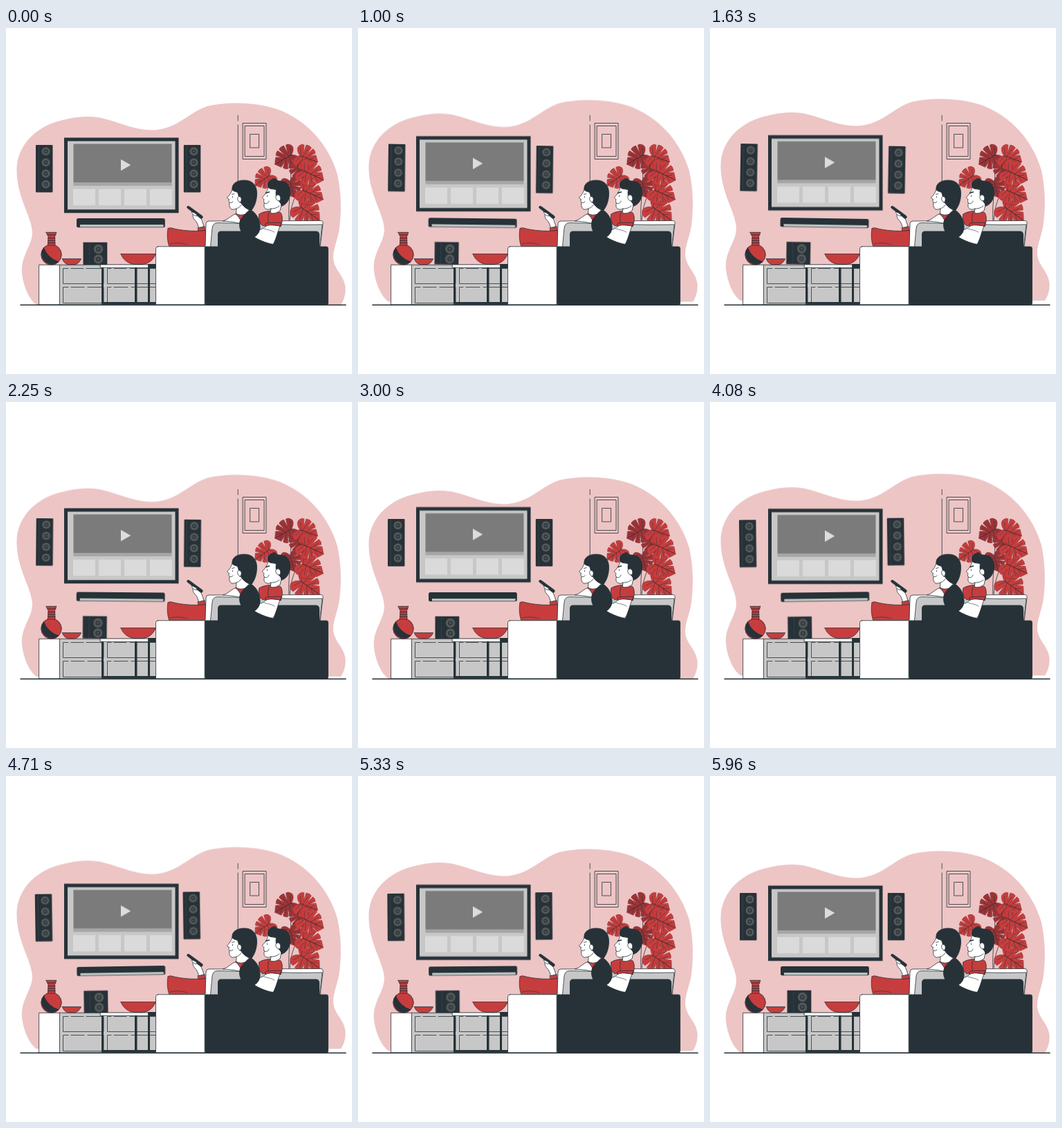
These frames come from a looping animation (500x500 px, 6000 ms). An HTML page:

```html
<!DOCTYPE html>
<html lang="en">
<head>
<meta charset="utf-8">
<title>Movie night</title>
<style>
  html, body { margin: 0; width: 100%; height: 100%; overflow: hidden; background: #fff; }
  svg { display: block; width: 100%; height: 100%; }
  .dark { fill: #263238; }
  .red { fill: #c73d3d; }
  .grey { fill: #c7c7c7; }
  .white { fill: #fff; }
  .ink { stroke: #263238; stroke-width: .8; stroke-linejoin: round; stroke-linecap: round; }
  .line { fill: none; }
  .deep { fill: #9d3437; }
  #blob { fill: #edc5c5; animation: rise 3s linear infinite; }
  #tv { animation: rise 6s linear infinite; }
  #audio { transform-origin: 162px 255.5px; animation: sway 6s linear infinite; }
  @keyframes rise { 50% { transform: translateY(-6.67px); } }
  @keyframes sway {
    0%, 100% { transform: rotate(0deg); }
    25% { transform: rotate(1deg); }
    75% { transform: rotate(-1deg); }
  }
</style>
</head>
<body>
<svg viewBox="0 0 500 500">
  <defs>
    <g id="cone">
      <circle r="6" fill="#555859"/>
      <circle r="3" fill="#263238"/>
      <circle r="1.9" fill="#484e51"/>
    </g>
    <g id="tower">
      <rect class="dark" x="0" y="0" width="24.5" height="68.5" rx="1"/>
      <path d="M4.2 1V67.5" stroke="#465055" stroke-width=".5"/>
      <use href="#cone" x="14.6" y="9.2"/>
      <use href="#cone" x="14.6" y="25.2"/>
      <use href="#cone" x="14.6" y="41.2"/>
      <use href="#cone" x="14.6" y="56.8"/>
    </g>
    <!-- split leaf, tip along +x -->
    <g id="half">
      <path d="M-8 .2C-13 -2 -19 -9 -15 -14C-13 -17 -10 -18 -8 -17.500L-4.500 -6L-5 -18.500Q1 -20 4.500 -17L1.500 -5.500L7.500 -16.500Q12 -15 13.500 -11L6.500 -4.500L15.500 -9Q18.500 -5 22 .2Z" stroke="#7d282c" stroke-width=".4"/>
      <path class="line" d="M-7 0L-12 -11M-4 0L0 -14M2 0L9 -11M8 0L15 -5"/>
    </g>
    <g id="leaf" stroke="#263238" stroke-width=".45">
      <use href="#half"/>
      <use href="#half" transform="scale(1 -1)"/>
      <path d="M-8 0H20" stroke-width=".7"/>
    </g>
  </defs>

  <path id="blob" d="M15.500 207C15 172 40 144 78 134C98 128.500 115 126.500 132 129C158 133 180 147 211 147.500C247 147 262 123 291 113C320 106 360 107 391 117C434 132 467 169 479 212C484.500 238 485 262 482 288C480 305 472 320 473 334C475 350 488 357 490.500 374C491 384 489 392 484 400H44C34 393 25 374 23 354C21 329 38 315 38 295C37 272 16 245 15.500 207Z"/>

  <g class="ink line">
    <path d="M335.200 126.500V134M335.200 140V222"/>
    <path d="M342.500 137.500H376V189.500H342.500ZM345.500 141.500H373V185.500H345.500ZM353 153.500H365.500V173H353Z"/>
  </g>

  <g id="tv">
    <rect class="dark" x="84" y="158.500" width="165.500" height="108.800"/>
    <rect class="grey" x="89" y="163.500" width="155.500" height="98.800"/>
    <rect x="97.500" y="167.500" width="142" height="56" fill="#7b7b7b"/>
    <rect x="97.500" y="223.500" width="142" height="4.500" fill="#a6a6a6"/>
    <path d="M166 189.800V206.200L180.300 198Z" fill="#dcdcdc"/>
    <path d="M97 232.700h32v23.500h-32zM134 232.700h32v23.500h-32zM171 232.700h32v23.500h-32zM208 232.700h32v23.500h-32z" fill="#dadada"/>
  </g>

  <g id="audio">
    <use href="#tower" x="43" y="169"/>
    <use href="#tower" x="256.800" y="169"/>
    <rect class="dark" x="102" y="275" width="127.800" height="13.200" rx="2.500"/>
    <rect class="grey" x="107" y="284.200" width="120.500" height="3.300"/>
    <rect class="dark" x="111.500" y="309.700" width="34.800" height="32.300"/>
    <path d="M120.700 310.500V342" stroke="#465055" stroke-width=".5"/>
    <use href="#cone" transform="translate(133.500 319.500) scale(1.120)"/>
    <use href="#cone" transform="translate(133.500 334) scale(1.120)"/>
  </g>

  <!-- cabinet and table -->
  <g class="ink">
    <rect class="grey" x="77.500" y="342.300" width="140" height="57.700"/>
    <rect class="white" x="48" y="342.300" width="29.500" height="57.700"/>
    <path class="line" d="M90 347.500H82.500V369.500H141V347.500H116M112 347.500H94M90 374.500H82.500V397.500H141V374.500H118M113 374.500H94M152 347.500H146.500V369.500H216M156 347.500H174M179 347.500H216M152 374.500H146.500V397.500H216M156 374.500H176M181 374.500H216"/>
  </g>
  <g class="dark">
    <path d="M138 346H141V396H186V346H189.500V396H205V347H208V396H217V399.500H138Z"/>
    <rect x="205" y="341" width="13" height="6"/>
  </g>
  <rect class="white ink" x="136.500" y="342" width="69" height="4.200"/>

  <!-- vase and bowls -->
  <g class="ink">
    <circle class="red" cx="65.500" cy="327.500" r="14.800"/>
    <path class="dark" d="M54.500 317.800A14.800 14.800 0 0 0 76 337.800Q61 333 54.500 317.800Z"/>
    <path class="red" d="M58 295.300H73L70.500 301L71 314H60.500L61 301Z"/>
    <path class="line" d="M59.500 299H72M61 303.500H70.700M61 307H70.700M60.700 310.500H71" stroke-width="1.200"/>
    <path class="red" d="M81.500 333.500H108.500C106 340 101 342 98 342H92C87 342 83 339 81.500 333.500Z"/>
    <path class="red" d="M166 326.500H216.500C212 337 204 341.500 196 341.500H186C177 341 169 335 166 326.500Z"/>
  </g>

  <!-- plant -->
  <path class="ink line" d="M411 195C414 225 407 250 409 280M434 220C422 232 412 250 410 278"/>
  <use class="deep" href="#leaf" transform="translate(423 204) rotate(70) scale(.72)"/>
  <use class="deep" href="#leaf" transform="translate(412 228) rotate(75) scale(.8)"/>
  <use class="red" href="#leaf" transform="translate(375 217) rotate(145) scale(.85 .8)"/>
  <use class="deep" href="#leaf" transform="translate(406 187) rotate(150) scale(.92)"/>
  <use class="red" href="#leaf" transform="translate(432 187) rotate(20) scale(.9 .95)"/>
  <use class="red" href="#leaf" transform="translate(433 264) rotate(35) scale(1.130 1.050)"/>
  <use class="red" href="#leaf" transform="translate(437 238) rotate(25) scale(1.080 .95)"/>
  <use class="red" href="#leaf" transform="translate(438 210) rotate(25) scale(1.060 1)"/>

  <!-- remote, hand, pillow -->
  <g class="ink">
    <path class="red" d="M277.500 288.500L287 286.500L289 302H279Z"/>
    <path class="white" d="M269 267C267 264 271 264 274 266L278 270C282 274 284 280 286 287L278.500 288.500C277 283 275.500 280 272.500 277C269 274 271 270 269 267Z"/>
    <path class="dark" d="M262 260C260.500 258 263 256.500 265 258L283.500 271.500C285.500 273.500 283 276.500 281 275Z"/>
    <path class="white" d="M269 266C273 267 277 270 275.500 271.500C274 272 271 270 269.500 269"/>
    <path class="red" d="M234 290C236 287.500 241 289.500 245 290.500C260 293.500 276 294 289 292.500V316H236C233 308 232.500 298 234 290Z"/>
    <path class="line" d="M237 312C246 310 254 310.500 262 313" stroke-width=".6"/>
  </g>

  <!-- sofa back cushions -->
  <g class="ink">
    <path class="white" d="M288 316L289 283Q289 279 293 279L452 278.500Q459 277.500 458 283L454 316Z"/>
    <path class="grey" d="M295.500 316L298 289Q299 281.500 306 281.500L420 284.500L457 284L453.500 316Z"/>
  </g>

  <!-- woman -->
  <g class="ink">
    <path class="white" d="M314 279C321 277 326 270 334 267.500L346 266L352 288C340 281 326 280 314 279Z"/>
    <path class="red" d="M332 269C339 265 346 265 353 267L356 292C350 290 345 287 341 283C339 278 337 273 332 269Z"/>
    <path class="white" d="M328 230C326 236 325.500 239 319.500 245C320 247 322 247 322.500 247.500C321.500 250 322 251 323 252C322 256 323 260 326 262C329 262.500 332 261.500 333 261L332.500 268C338 272 346 270 351 266L352 240L341 228Z"/>
    <path class="dark" d="M327 233.500C325.500 225 334 220 344 220C356 219.500 363.500 228 362.500 241C362 251 359 258 354.500 264C348 262 343 258 340 253.500C336 249 337 243 334.500 237.500C331 236 328 236 327 233.500Z"/>
    <path class="white" d="M338 252C333.500 250 333.500 243 337.500 243.500C341 244 341 251 338 252Z"/>
    <path class="line" d="M326.500 240.500L330 239.500M327.500 243.500V245M323.500 252.500C325 253 327 252 328 251M340 256C337 259 336 260 333 261"/>
  </g>

  <!-- man -->
  <g class="ink">
    <path class="red" d="M366 269C372 264 389 263 397 267C401 273 399 282 397 287C389 284 380 282 371 286C366 282 364 275 366 269Z"/>
    <path class="white" d="M379 229C378 236 375 240 370.500 244.500C371 247 373 247 373 248C372 250 372.500 252 373.500 253C372 257 373 261 377 262C380 262.500 382 261.500 383 261L382 267C387 269 392 267 396 264L400 246L395 228Z"/>
    <path class="dark" d="M378.500 230C376 224 382 218 389 217.500C391 221 395 221 401 222C408 223 411.500 232 410.500 240C409.500 248 406 255 398 257.500C398 253 394 250 391.500 247C390 242 389.500 238 390.500 234C386 232 382 234 378.500 230Z"/>
    <path class="white" d="M395 250C389 250 388 241 393 241C397 241 398 249 395 250Z"/>
    <path class="line" d="M375.500 238.500L380.500 237" stroke-width="1.600"/>
    <path class="line" d="M377.500 242V243.500M373.500 253C376 255 379 253 380 250M395 257C392 260 387 261.500 383 261M380 267C378 274 378 278 380 283"/>
  </g>

  <!-- sofa front -->
  <path class="dark" d="M306 318V298.500Q306 293.500 311 293.500H447.500Q453 293.500 453 299V318Z"/>
  <g class="ink">
    <path class="white" d="M357 301C354.500 295 360 292 365 291.500C371 291 374 288 378 284L396 286C392 296 390 306 386 312.500C376 311 365 306 357 301Z"/>
    <path class="line" d="M373 290C378 292 384 292 388 295" stroke-width=".6"/>
    <path class="red" d="M376 282L397.500 281L396.500 286.500C389 284 382 284 374.500 286.500Z"/>
    <path class="dark" d="M354 263C363 268 368 280 367 290C365.500 299 358 304.500 351 303.500C343 302 336.500 292 337.500 282C338.500 274 345 270 349.500 265Z"/>
    <rect class="dark" x="287.500" y="316" width="178" height="84" rx="2.500"/>
    <path class="white" d="M219.500 315.800H287.200V400H216.500V319Q216.500 315.800 219.500 315.800Z"/>
  </g>

  <path class="ink line" d="M21 400.300H491" stroke-width="1.500" style="stroke-width: 1.500"/>
</svg>
</body>
</html>
```
